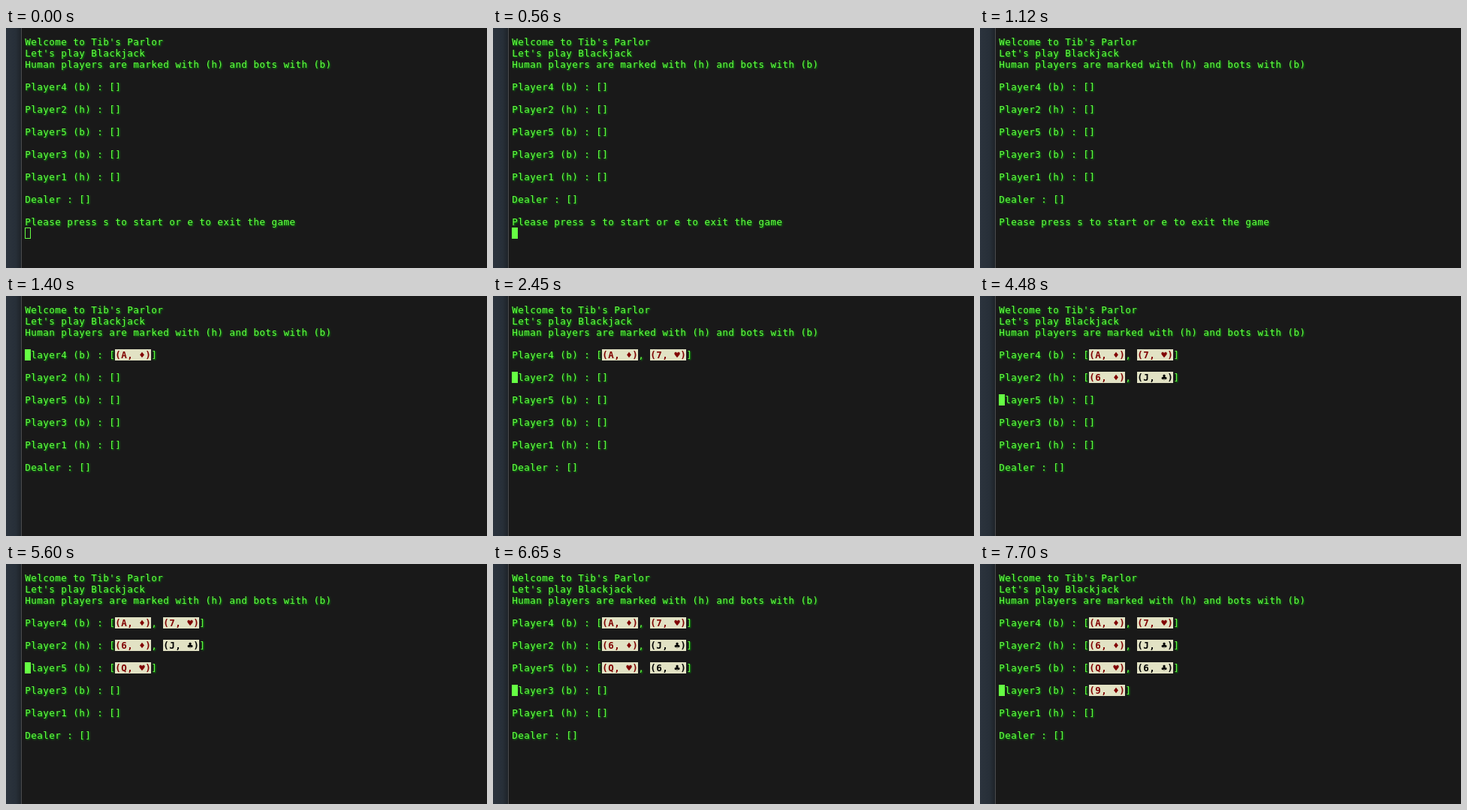
Recreate the animation shown at these times as an HTML page with a canvas. Size 640 by 320 pixels, loop 8 s.

```html
<!DOCTYPE html>
<html lang="en">
<head>
<meta charset="utf-8">
<title>Blackjack terminal</title>
<style>
  html, body { margin: 0; width: 640px; height: 320px; overflow: hidden; background: #191919; }
  canvas { display: block; }
</style>
</head>
<body>
<canvas id="stage" width="640" height="320"></canvas>
<script>
const ctx = document.getElementById('stage').getContext('2d');
const LOOP = 8000, LEFT = 25, TOP = 11, COL = 8, ROW = 15;
const GREEN = '#6f4', FOCUS_TIME = 490;
const players = ['Player4 (b)', 'Player2 (h)', 'Player5 (b)', 'Player3 (b)', 'Player1 (h)', 'Dealer'];
// Each deal: cursor blinks off, then the card lands and the cursor returns
const deals = [
  { off: 1120, on: 1330, card: 'A♦' },
  { off: 2100, on: 2450, card: '7♥' },
  { off: 3150, on: 3500, card: '6♦' },
  { off: 4200, on: 4480, card: 'J♣' },
  { off: 5250, on: 5530, card: 'Q♥' },
  { off: 6300, on: 6650, card: '6♣' },
  { off: 7350, on: 7700, card: '9♦' }
];

const x = col => LEFT + COL * col;
const y = row => TOP + ROW * row;

function glyphs(text, col, row, color, weight = 'normal') {
  ctx.font = `${weight} 12.5px "DejaVu Sans Mono", monospace`;
  ctx.fillStyle = color;
  [...text].forEach((ch, i) => ctx.fillText(ch, x(col + i) + 0.25, y(row) + 12));
}

function print(text, col, row) {
  ctx.shadowColor = '#0a0';
  ctx.shadowBlur = 2;
  ctx.shadowOffsetX = ctx.shadowOffsetY = 1;
  glyphs(text, col, row, GREEN);
  ctx.shadowColor = 'transparent';
}

function drawCard([rank, suit], col, row) {
  ctx.fillStyle = '#e2e2c4';
  ctx.fillRect(x(col), y(row), COL * 6, ROW);
  glyphs(`(${rank}, ${suit})`, col, row, suit === '♣' ? '#000' : '#800000', 'bold');
}

function drawHand(name, cards, row) {
  const label = name + ' : [';
  print(label, 0, row);
  let col = label.length;
  cards.forEach((card, i) => {
    if (i) {
      print(', ', col, row);
      col += 2;
    }
    drawCard(card, col, row);
    col += 6;
  });
  print(']', col, row);
}

function drawCursor(row, focused) {
  ctx.fillStyle = ctx.strokeStyle = GREEN;
  if (focused) ctx.fillRect(LEFT, y(row), COL, ROW);
  else ctx.strokeRect(LEFT + 0.5, y(row) + 0.5, COL - 1, ROW - 1);
}

function drawWindow() {
  ctx.fillStyle = '#191919';
  ctx.fillRect(0, 0, 640, 320);
  const edge = ctx.createLinearGradient(0, 0, 20, 0);
  edge.addColorStop(0, '#2b333d');
  edge.addColorStop(0.65, '#272f38');
  edge.addColorStop(1, '#1e2329');
  ctx.fillStyle = edge;
  ctx.fillRect(0, 0, 20, 320);
  ctx.fillStyle = '#4a4c4e';
  ctx.fillRect(20, 0, 1, 320);
}

function draw(t) {
  const dealt = deals.filter(d => t >= d.on).length;
  const blinkedOff = dealt < deals.length && t >= deals[dealt].off;
  drawWindow();
  print("Welcome to Tib's Parlor", 0, 0);
  print("Let's play Blackjack", 0, 1);
  print('Human players are marked with (h) and bots with (b)', 0, 2);
  players.forEach((name, i) => {
    const cards = deals.slice(0, dealt).slice(2 * i, 2 * i + 2).map(d => d.card);
    drawHand(name, cards, 4 + 2 * i);
  });
  if (!dealt) print('Please press s to start or e to exit the game', 0, 16);
  if (!blinkedOff) drawCursor(dealt ? 4 + 2 * Math.floor(dealt / 2) : 17, t >= FOCUS_TIME);
}

const start = performance.now();
function tick() {
  draw((performance.now() - start) % LOOP);
  requestAnimationFrame(tick);
}
tick();
</script>
</body>
</html>
```
